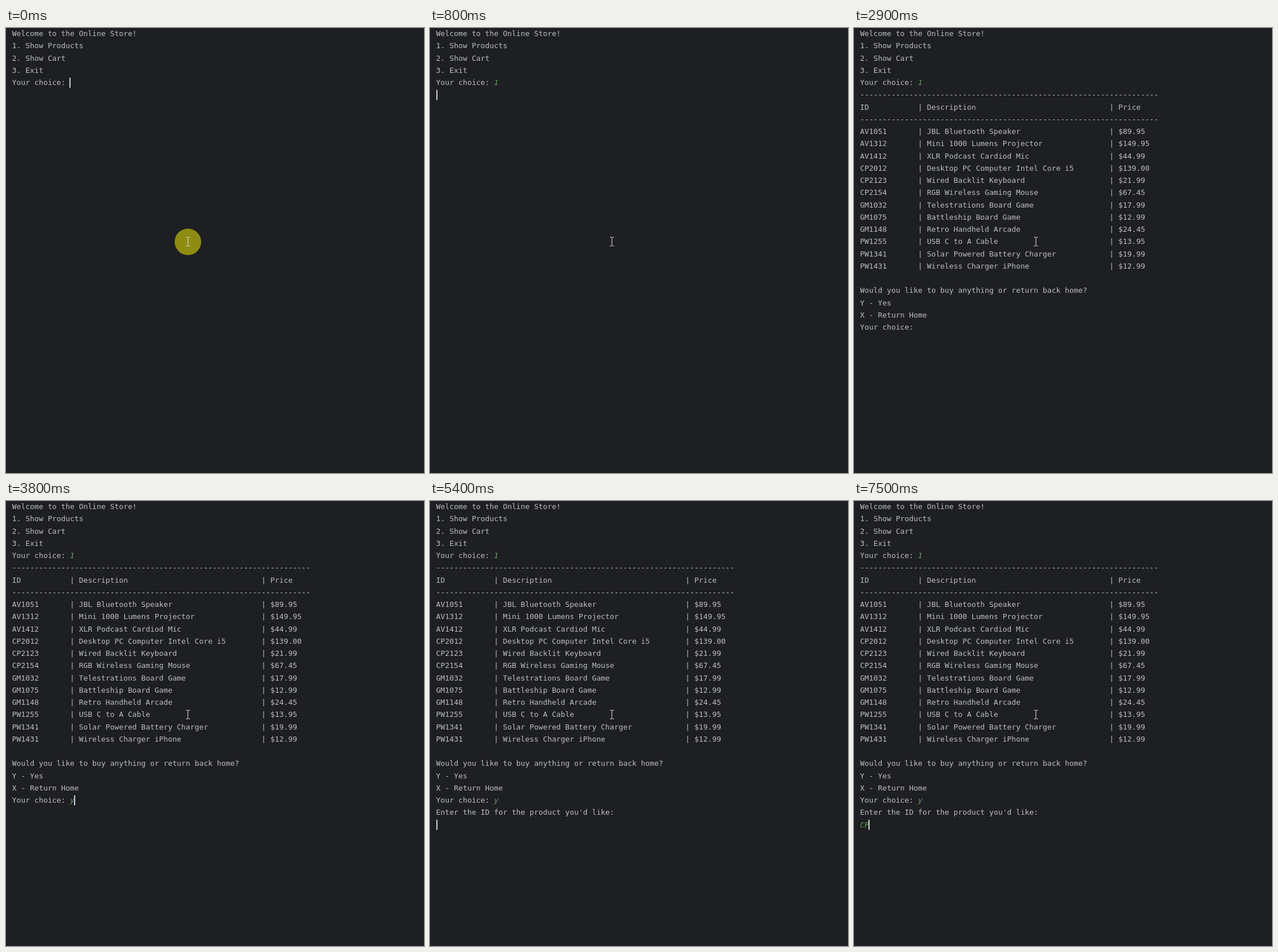
An HTML page for the animation above (8 s loop, 725 by 773 pixels).

```html
<!DOCTYPE html>
<html lang="en">
<head>
<meta charset="utf-8">
<title>Online store console</title>
<style>
  html, body { margin: 0; width: 100%; height: 100%; overflow: hidden; background: #1e1f22; }
  svg { display: block; }
  text { font: 12.83px "DejaVu Sans Mono", "Noto Sans Mono", monospace; fill: #bcbec4; white-space: pre; }
  .typed { font-style: italic; fill: #5fa35f; }
  #caret { fill: #ced0d6; }
  #halo { fill: #8f8c13; animation: fade 8s step-end infinite; }
  @keyframes fade {
    0% { opacity: 1 }
    1.25% { opacity: .75 }
    3.75% { opacity: .5 }
    5% { opacity: .25 }
    6.25%, 100% { opacity: 0 }
  }
</style>
</head>
<body>
<svg width="725" height="773" viewBox="0 0 725 773">
  <g id="screen"></g>
  <rect id="caret" width="2" height="17.6"/>
  <circle id="halo" cx="315.5" cy="371.5" r="23"/>
  <path d="M312 363.5h3M316 363.5h3M315.5 364v14M312 378.5h3M316 378.5h3" fill="none" stroke="#dedede"/>
</svg>
<script>
const LOOP = 8000, LEFT = 10.6, PITCH = 7.724, LEADING = 21.25;
const screen = document.getElementById('screen');
const caret = document.getElementById('caret');

const rule = '-'.repeat(67);
const tableRow = (id, name, price) => `${id.padEnd(13)}| ${name.padEnd(41)}| ${price}`;

const menu = [
  'Welcome to the Online Store!',
  '1. Show Products',
  '2. Show Cart',
  '3. Exit',
  'Your choice: '
];
const products = [
  rule,
  tableRow('ID', 'Description', 'Price'),
  rule,
  ...[
    ['AV1051', 'JBL Bluetooth Speaker', '$89.95'],
    ['AV1312', 'Mini 1000 Lumens Projector', '$149.95'],
    ['AV1412', 'XLR Podcast Cardiod Mic', '$44.99'],
    ['CP2012', 'Desktop PC Computer Intel Core i5', '$139.00'],
    ['CP2123', 'Wired Backlit Keyboard', '$21.99'],
    ['CP2154', 'RGB Wireless Gaming Mouse', '$67.45'],
    ['GM1032', 'Telestrations Board Game', '$17.99'],
    ['GM1075', 'Battleship Board Game', '$12.99'],
    ['GM1148', 'Retro Handheld Arcade', '$24.45'],
    ['PW1255', 'USB C to A Cable', '$13.95'],
    ['PW1341', 'Solar Powered Battery Charger', '$19.99'],
    ['PW1431', 'Wireless Charger iPhone', '$12.99']
  ].map(item => tableRow(...item)),
  '',
  'Would you like to buy anything or return back home?',
  'Y - Yes',
  'X - Return Home',
  'Your choice: '
];

// Each printed piece appears at its own time.
const pieces = [];
function print(content, row, start, col = 0, typed = false) {
  const el = document.createElementNS('http://www.w3.org/2000/svg', 'text');
  el.textContent = content;
  el.setAttribute('x', LEFT + col * PITCH);
  el.setAttribute('y', Math.round(14.2 + row * LEADING));
  if (typed) el.classList.add('typed');
  screen.append(el);
  pieces.push({ el, start });
}
const type = (content, row, start, col) => print(content, row, start, col, true);

menu.forEach((line, i) => print(line, i, 0));
type('1', 4, 400, 13);
products.forEach((line, i) => print(line, 5 + i, 1000));
type('y', 24, 3800, 13);
print("Enter the ID for the product you'd like:", 25, 4400);
type('C', 26, 7300, 0);
type('P', 26, 7500, 1);

// Caret stops: start, row, column, and when blinking begins.
const stops = [
  [0, 4, 13], [400, 4, 14], [800, 5, 0], [1000, 24, 13, 1900],
  [3800, 24, 14], [4400, 26, 0, 4900], [7300, 26, 1], [7500, 26, 2]
];

function draw(now) {
  const t = now % LOOP;
  for (const { el, start } of pieces) el.style.visibility = t >= start ? 'visible' : 'hidden';

  const [, row, col, blink = LOOP] = stops.findLast(stop => t >= stop[0]);
  caret.setAttribute('x', Math.max(11, Math.floor(10.1 + col * PITCH)));
  caret.setAttribute('y', 1.2 + row * LEADING);
  const off = t >= blink && Math.floor((t - blink) / 500) % 2 === 0;
  caret.style.visibility = off ? 'hidden' : 'visible';
}

const halo = document.getElementById('halo').getAnimations()[0];
function tick() {
  const now = performance.now();
  halo.currentTime = now;
  draw(now);
  requestAnimationFrame(tick);
}
tick();
</script>
</body>
</html>
```
